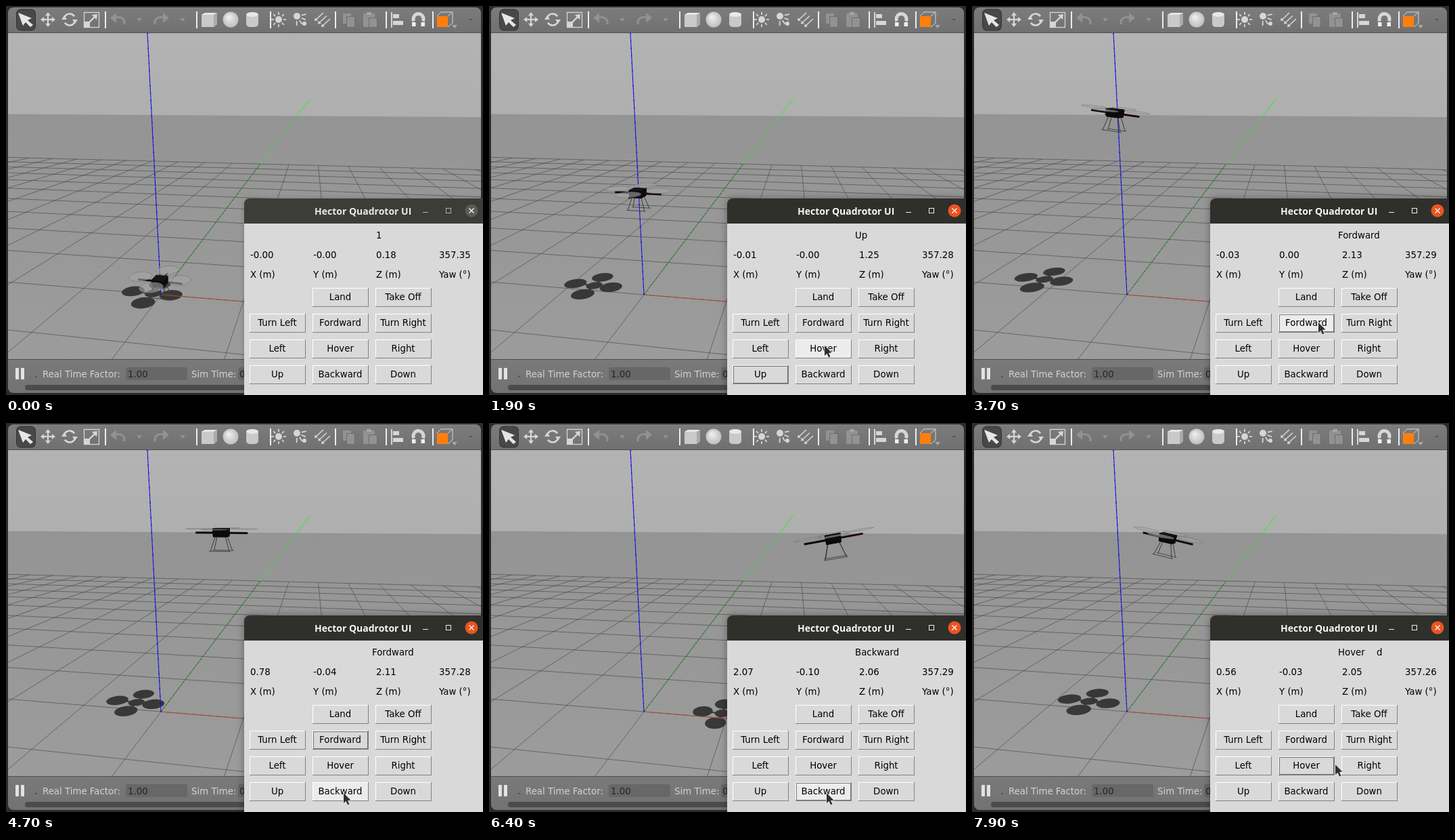
An HTML page with a canvas for the animation above (8 s loop, 705 by 574 pixels).

```html
<!DOCTYPE html>
<html lang="en">
<head>
<meta charset="utf-8">
<title>Quadrotor simulation</title>
<style>
html, body { margin: 0; width: 100%; height: 100%; overflow: hidden; background: #2c2c2c; }
canvas { display: block; width: 705px; height: 574px; }
</style>
</head>
<body>
<canvas id="stage" width="705" height="574"></canvas>
<script>
const c = document.getElementById('stage').getContext('2d');
const LOOP = 8000, TICK = 100;
const SANS = '13.33px "DejaVu Sans", sans-serif';

// Button clicks, with the pointer's place and when it sets off
const clicks = [
  { t: 600, name: 'Up', go: 100, x: 403, y: 550 },
  { t: 2400, name: 'Hover', go: 1200, x: 495, y: 500 },
  { t: 3600, name: 'Fordward', go: 2900, x: 511, y: 466 },
  { t: 5700, name: 'Backward', go: 3900, x: 498, y: 545 },
  { t: 7600, name: 'Hover', go: 6400, x: 512, y: 504 }
];
const moves = [...clicks, { go: 7500, x: 536, y: 503 }];

const clamp = u => Math.max(0, Math.min(1, u));
const ease = (t, a, b) => { const u = clamp((t - a) / (b - a)); return u * u * (3 - 2 * u); };
const hump = (t, a, b) => Math.sin(Math.PI * clamp((t - a) / (b - a)));

// Seconds travelled at unit speed when the speed ramps up linearly from a to b
function glide(t, a, b) {
  const u = clamp((t - a) / (b - a));
  return (u * u * (b - a) / 2 + Math.max(0, t - b)) / 1000;
}
const lastClick = t => clicks.filter(k => k.t <= t).pop();

function pointer(t) {
  return moves.reduce((p, m) => {
    const u = ease(t, m.go, m.go + 400);
    return { x: p.x + (m.x - p.x) * u, y: p.y + (m.y - p.y) * u };
  }, { x: 450, y: 600 });
}

function flight(t) {
  const pitch = .21 * hump(t, 3500, 4500) - .22 * hump(t, 5650, 6800) + .21 * hump(t, 7600, 8200);
  const x = -.003 - .025 * clamp(t / 3700) ** 2 + 1.065 * glide(t, 3700, 4190) - 2.106 * glide(t, 5750, 6612);
  const y = t < 2500 ? -.002 : -.048 * x;
  const z = .18 + .973 * (glide(t, 600, 1000) - glide(t, 2500, 3110)) - .02 * ease(t, 3700, 4500) - .06 * ease(t, 5900, 6600);
  const yaw = 357.281 + .07 * (1 - ease(t, 100, 900)) + .006 * (Math.abs(pitch) > .01) - .023 * ease(t, 6300, 6900);
  const cp = Math.cos(pitch), sp = Math.sin(pitch), a = (yaw - 360) * Math.PI / 180;
  const world = ([u, v, h]) => {
    const f = u * cp + h * sp;
    return [x + f * Math.cos(a) - v * Math.sin(a), y + f * Math.sin(a) + v * Math.cos(a), z - u * sp + h * cp];
  };
  return { x, y, z, yaw, world };
}

// Perspective camera
const depth = (x, y, z) => 1 - .0339 * x + .193 * y - .0466 * z;
function project([x, y, z = 0]) {
  const w = depth(x, y, z);
  return [(229 + 110 * x + 87.2 * y - 16.56 * z) / w, (426 - 4.68 * x + 25.7 * y - 133.6 * z) / w];
}

function path(pts, close) {
  c.beginPath();
  pts.forEach(p => c.lineTo(p[0], p[1]));
  if (close) c.closePath();
}
function line(pts, color, width = 1, dash = []) {
  path(pts);
  c.strokeStyle = color;
  c.lineWidth = width;
  c.setLineDash(dash);
  c.stroke();
  c.setLineDash([]);
}
function poly(pts, color) {
  path(pts, true);
  c.fillStyle = color;
  c.fill();
}
function rect(x, y, w, h, color, r = 0) {
  c.fillStyle = color;
  c.beginPath();
  c.roundRect(x, y, w, h, r);
  c.fill();
}
function disc(x, y, r, color) {
  c.fillStyle = color;
  c.beginPath();
  c.arc(x, y, r, 0, 7);
  c.fill();
}
function text(s, x, y, color = '#000', font = SANS, align = 'left') {
  c.font = font;
  c.fillStyle = color;
  c.textAlign = align;
  c.fillText(s, x, y);
}
function fade(y0, y1, from, to) {
  const g = c.createLinearGradient(0, y0, 0, y1);
  g.addColorStop(0, from);
  g.addColorStop(1, to);
  return g;
}

function groundLine(a, b) {
  const near = .1, wa = depth(...a, 0), wb = depth(...b, 0);
  if (wa < near && wb < near) return;
  const cut = (p, q, wp, wq) => {
    const u = wp < near ? (near - wp) / (wq - wp) : 0;
    return p.map((v, i) => v + (q[i] - v) * u);
  };
  line([project(cut(a, b, wa, wb)), project(cut(b, a, wb, wa))], 'rgba(68,68,68,.62)');
}

function drawGround() {
  rect(3, 40, 699, 481, fade(40, 162, '#b3b3b3', '#afafaf'));
  poly([[3, 159.5], [702, 164], [702, 521], [3, 521]], fade(160, 521, '#949494', '#9c9c9c'));
  for (let i = -10; i <= 10; i++) {
    groundLine([i, -10], [i, 10]);
    groundLine([-10, i], [10, i]);
  }
}

function drawAxes() {
  const o = project([0, 0]), far = project([0, 10]), up = [209, 40];
  line([o, project([1, 0])], '#b8463c');
  line([o, far], '#359035');
  line([o, far], '#256a25', 1, [2, 4]);
  line([far, [450, 136]], '#4fd04f');
  line([[430, 162], [450, 136]], '#3cf03c', 1.2, [5, 2]);
  line([o, up], '#1414fa', 1.1);
  line([o, up], '#101060', 1.1, [2, 9]);
}

const ARM = .245, BLADE = .135;
const HUBS = [[0, ARM], [-ARM, 0], [ARM, 0], [0, -ARM]];
const ring = ([a, b], r, h) => Array.from({ length: 30 }, (_, i) => {
  const q = i * Math.PI / 15;
  return [a + r * Math.cos(q), b + r * Math.sin(q), h];
});
const square = (r, h) => [[-r, -r, h], [r, -r, h], [r, r, h], [-r, r, h]];

function drawShadow(d) {
  const dark = '#383838';
  const drop = p => {
    const [x, y, z] = d.world(p);
    return project([x - z * .552, y + z * .106]);
  };
  HUBS.forEach(h => poly(ring(h, BLADE, .035).map(drop), dark));
  line([drop([-ARM, 0, 0]), drop([ARM, 0, 0])], dark, 2);
  line([drop([0, -ARM, 0]), drop([0, ARM, 0])], dark, 2.5);
  poly(ring([0, 0], .1, 0).map(drop), dark);
}

function drawDrone(d) {
  const p = q => project(d.world(q));
  const rotor = h => {
    const pts = ring(h, BLADE, .03).map(p);
    poly(pts, 'rgba(165,165,165,.6)');
    line([...pts, pts[0]], 'rgba(80,80,80,.6)', 1, [1, 1]);
  };
  for (const s of [1, -1]) {
    for (const f of [-1, 1]) line([p([f * .055, s * .04, -.05]), p([f * .1, s * .07, -.195])], '#3a3a3a');
    line([p([-.115, s * .07, -.195]), p([.115, s * .07, -.195])], '#444');
  }
  line([p([0, -ARM, -.01]), p([0, ARM, -.01])], '#101010', 2);
  line([p([-.28, 0, -.01]), p([0, 0, -.01])], '#080808', 3);
  line([p([0, 0, -.01]), p([.28, 0, -.01])], '#1c0707', 3);
  HUBS.slice(0, 3).forEach(rotor);
  const top = square(.075, .035).map(p), base = square(.07, -.05).map(p);
  poly(base, '#0b0b0b');
  top.forEach((a, i) => poly([a, top[(i + 1) % 4], base[(i + 1) % 4], base[i]], '#0b0b0b'));
  poly(top, '#151515');
  rotor(HUBS[3]);
}

function arrow(x1, y1, x2, y2, color, w = 2, head = 4) {
  const q = Math.atan2(y2 - y1, x2 - x1), k = Math.cos(q), s = Math.sin(q);
  line([[x1, y1], [x2 - k * head, y2 - s * head]], color, w);
  poly([[x2, y2], [x2 - k * head * 1.3 - s * head, y2 - s * head * 1.3 + k * head],
        [x2 - k * head * 1.3 + s * head, y2 - s * head * 1.3 - k * head]], color);
}
const tri = (x, y, color) => poly([[x - 4, y - 2], [x + 4, y - 2], [x, y + 3]], color);

function undo(x, dir, color) {
  c.strokeStyle = color;
  c.lineWidth = 3;
  c.beginPath();
  c.moveTo(x - dir * 6, 17);
  c.quadraticCurveTo(x + dir * 10, 14, x + dir * 9, 27);
  c.stroke();
  poly([[x - dir * 12, 17.5], [x - dir * 3, 10], [x - dir * 3, 25]], color);
}

function drawTools(lite, dim) {
  rect(15, 4.5, 29, 32, '#343434', 7);
  rect(16, 5.5, 27, 30, '#484848', 6);
  poly([[18, 10], [38, 18], [32, 21], [40, 28], [36, 31], [29, 24], [25, 29]], '#e6e6e6');
  for (let i = 0; i < 4; i++) {
    const q = i * Math.PI / 2;
    arrow(62, 20, 62 + 11 * Math.cos(q), 20 + 11 * Math.sin(q), lite, 2.2);
  }
  c.strokeStyle = lite;
  c.lineWidth = 2.6;
  for (const q of [.15, Math.PI + .15]) {
    c.beginPath();
    c.arc(94, 20, 8.5, q, q + 2.4);
    c.stroke();
  }
  poly([[82, 20], [90, 20], [86, 14]], lite);
  poly([[98, 20], [106, 20], [102, 26]], lite);
  c.lineWidth = 1.3;
  c.strokeRect(115.5, 9.5, 22, 22);
  arrow(122, 25, 135, 12, lite, 2.4, 5);
  rect(115, 23, 9, 9, lite);
  undo(166, 1, dim);
  undo(229, -1, dim);
  tri(197, 20, dim);
  tri(261, 20, dim);
}

function drawSolids() {
  poly([[289, 13], [294, 10], [312, 10], [312, 27], [307, 31], [289, 31]], '#c9c9c9');
  poly([[289, 13], [294, 10], [312, 10], [307, 13]], '#e6e6e6');
  poly([[307, 13], [312, 10], [312, 27], [307, 31]], '#aaaaaa');
  const ball = c.createRadialGradient(329, 16, 1, 332, 20, 12);
  ball.addColorStop(0, '#eeeeee');
  ball.addColorStop(1, '#bdbdbd');
  disc(332, 20, 11.5, ball);
  rect(355, 10, 18, 21, '#c9c9c9', 5);
  c.fillStyle = '#e8e8e8';
  c.beginPath();
  c.ellipse(364, 12.5, 9, 3.5, 0, 0, 7);
  c.fill();
}

function rays(x, y, n, from, step, r1, r2, color) {
  for (let i = 0; i < n; i++) {
    const k = Math.cos(from + i * step), s = Math.sin(from + i * step);
    line([[x + r1 * k, y + r1 * s], [x + r2 * k, y + r2 * s]], color, 1.8);
  }
}

function drawLights(lite) {
  disc(403, 20, 5, lite);
  rays(403, 20, 8, 0, Math.PI / 4, 7, 11, lite);
  disc(430, 15, 5, lite);
  rays(430, 15, 4, -.2, .6, 7, 14, lite);
  disc(441, 26, 3, lite);
  for (let i = 0; i < 3; i++) arrow(469 + i * 5, 10 + i * 4.5, 456 + i * 5, 22 + i * 4.5, lite, 1.6, 3);
}

function drawEdit(lite, dim) {
  rect(498, 11, 12, 15, dim, 1);
  rect(503, 15, 13, 17, '#6d6d6d', 1);
  rect(504, 16, 11, 15, dim, 1);
  rect(528, 11, 17, 20, dim, 2);
  rect(533, 9, 7, 4, '#a4a4a4', 1);
  rect(536, 17, 13, 15, '#6d6d6d');
  rect(537, 18, 11, 13, dim);

  rect(569, 9, 2, 23, lite);
  rect(572, 12, 9, 6, lite);
  rect(572, 22, 15, 6, lite);
  c.strokeStyle = lite;
  c.lineWidth = 5;
  c.beginPath();
  c.arc(609.5, 19, 7.5, Math.PI * .85, Math.PI * .15);
  c.stroke();
  for (const x of [600, 613.5]) rect(x, 24, 5.5, 6, '#efefef');

  line([[637, 15], [643, 9], [660, 9], [660, 25], [653, 31]], lite);
  line([[653, 15], [660, 9]], lite);
  rect(637, 15, 16, 16, '#ff7f0e');
  tri(663, 30, '#a8a8a8');
  rect(685, 19, 4, 2, '#555');
}

function drawToolbar() {
  const lite = '#d6d6d6', dim = '#929292';
  rect(3, 2, 699, 38, fade(2, 40, '#7c7c7c', '#707070'), [8, 8, 0, 0]);
  rect(3, 39, 699, 1, '#4e4e4e');
  for (const x of [147, 282, 391, 487, 562, 631]) rect(x - 1, 8, 2, 25, '#ececec');
  drawTools(lite, dim);
  drawSolids();
  drawLights(lite);
  drawEdit(lite, dim);
}

function drawStatus() {
  rect(3, 521, 699, 50, fade(521, 571, '#7a7a7a', '#727272'), [0, 0, 8, 8]);
  rect(3, 521, 699, 1, '#4e4e4e');
  for (const x of [14, 22]) rect(x, 534, 5, 17, '#e2e2e2', 1);
  rect(43, 546, 3, 1.5, '#4c4c4c');
  for (const x of [177, 343]) rect(x, 533, 91, 19, '#676767', 3);
  text('Real Time Factor:', 54, 548, '#d2d2d2');
  text('1.00', 180, 548, '#262626');
  text('Sim Time:', 274, 548, '#d2d2d2');
  text('0', 345, 548, '#262626');
  rect(28, 559, 660, 8, '#4b4b4b', 4);
}

const KEYS = [['', 'Land', 'Take Off'], ['Turn Left', 'Fordward', 'Turn Right'], ['Left', 'Hover', 'Right'], ['Up', 'Backward', 'Down']];

function drawButton(name, x, y, t, mouse) {
  const w = 83, h = 28, last = lastClick(t);
  const focus = last && last.name === name, down = focus && t - last.t < TICK;
  const over = mouse.x >= x && mouse.x < x + w && mouse.y >= y && mouse.y < y + h;
  rect(x, y, w, h, down ? '#fff' : '#828282');
  rect(x, y, w - 1, h - 1, down ? '#828282' : '#fff');
  rect(x + 1, y + 1, w - 2, h - 2, over ? '#ececec' : '#d9d9d9');
  if (focus) {
    c.strokeStyle = '#000';
    c.lineWidth = 1;
    c.setLineDash([1, 1]);
    c.strokeRect(x + 1.5, y + 1.5, w - 3, h - 3);
    c.setLineDash([]);
  }
  const push = down ? 1 : 0;
  text(name, x + 41 + push, y + 18 + push, '#000', SANS, 'center');
}

function drawTitle(lit) {
  c.save();
  c.shadowColor = `rgba(0,0,0,${lit ? .35 : .2})`;
  c.shadowBlur = lit ? 12 : 7;
  rect(352, 284, 360, 300, lit ? '#2f302c' : '#3c3c39', 8);
  c.restore();
  text('Hector Quadrotor UI', 456, 308, lit ? '#f5f5f5' : '#e8e8e6', 'bold 14px "Open Sans", "Noto Sans", sans-serif');
  const mark = lit ? '#f0f0f0' : '#b0b0aa';
  rect(616, 304, 8, 1, mark);
  c.strokeStyle = mark;
  c.lineWidth = 1;
  c.strokeRect(650.5, 298.5, 7, 7);
  disc(688, 302, 9.5, lit ? '#e95420' : '#5a5a57');
  for (const s of [-3.5, 3.5]) line([[688 - s, 298.5], [688 + s, 305.5]], '#fff', 1.3);
}

function drawPanel(t, d, mouse) {
  drawTitle(t >= clicks[0].t);
  rect(352, 321, 353, 253, '#d9d9d9');
  const told = lastClick(t - TICK);
  text(told ? told.name : '1', told ? 541 : 547, 343);
  // the longer word's tail stays behind
  if (told === clicks[4]) text('d', 598, 343);
  const values = [d.x, d.y, d.z, d.yaw];
  ['X (m)', 'Y (m)', 'Z (m)', 'Yaw (°)'].forEach((s, i) => {
    text(values[i].toFixed(2), 361 + 93 * i, 372);
    text(s, 361 + 93 * i, 401);
  });
  KEYS.forEach((row, j) => row.forEach((s, i) => {
    if (s) drawButton(s, 360 + 93 * i, 416 + 38 * j, t, mouse);
  }));
}

function drawMouse({ x, y }) {
  const shape = [[0, 0], [0, 15], [3.5, 12], [6, 17.5], [8.5, 16.4], [6, 11], [10.5, 10.6]];
  path(shape.map(p => [p[0] + x + 1, p[1] + y + 1]), true);
  c.lineJoin = 'round';
  c.strokeStyle = '#f0f0f0';
  c.lineWidth = 1.4;
  c.stroke();
  c.fillStyle = '#303030';
  c.fill();
  c.lineJoin = 'miter';
}

function draw(t) {
  const d = flight(t), mouse = pointer(t);
  rect(0, 0, 705, 574, '#2c2c2c');
  c.save();
  c.beginPath();
  c.rect(3, 40, 699, 481);
  c.clip();
  drawGround();
  drawShadow(d);
  drawAxes();
  drawDrone(d);
  c.restore();
  drawToolbar();
  drawStatus();
  drawPanel(t, d, mouse);
  drawMouse(mouse);
}

let last = -1;
function frame() {
  const t = Math.floor(performance.now() % LOOP / TICK) * TICK;
  if (t !== last) draw(last = t);
  requestAnimationFrame(frame);
}
frame();
</script>
</body>
</html>
```
